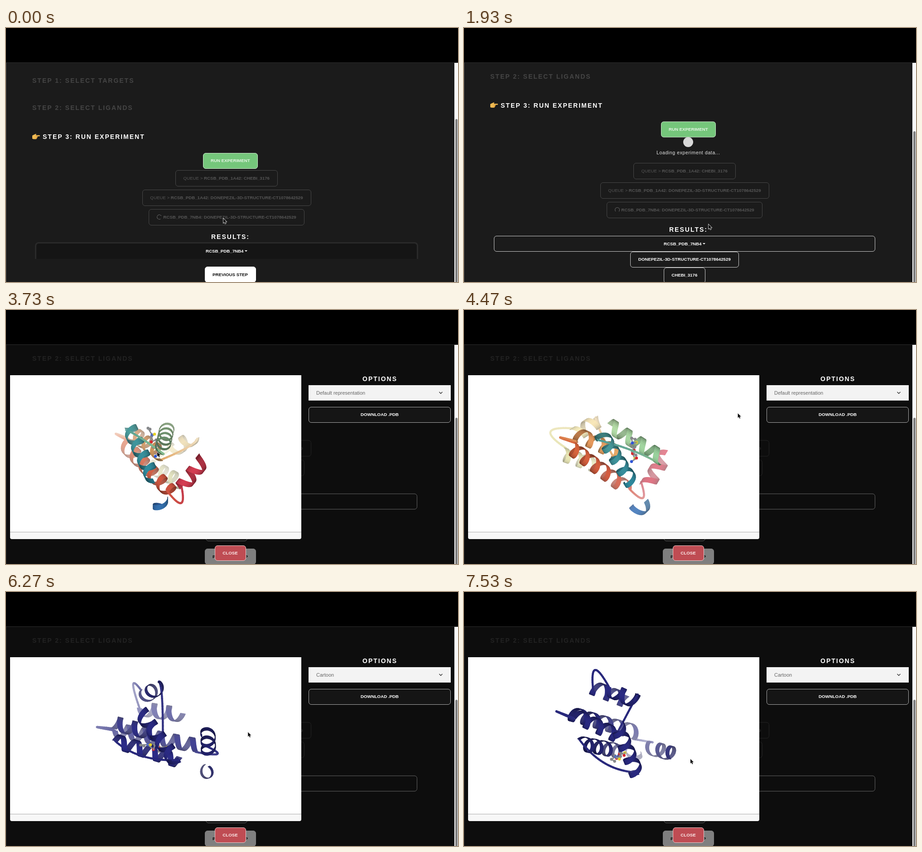
An HTML page with a canvas that plays this animation: 998x561 px, repeating every 7.59 s.

```html
<!DOCTYPE html>
<html lang="en">
<head>
<meta charset="utf-8">
<title>Docking experiment</title>
<style>
html, body { margin: 0; width: 998px; height: 561px; overflow: hidden; background: #000; }
body { position: relative; font: bold 9.7px "Liberation Sans", Arial, sans-serif; color: #fff; }
div, canvas, svg { position: absolute; box-sizing: border-box; }
.fill { left: 0; top: 0; width: 998px; height: 561px; }
.txt { height: 20px; line-height: 20px; white-space: pre; }
.head { font-size: 14px; letter-spacing: 2px; }
.dim { color: #454545; }
.box { text-align: center; white-space: pre; border: 1px solid #ccc; border-radius: 6px; }
.queue { border: 1.5px solid #484848; color: #555; font-weight: normal; }
.run { background: #75c67b; border-color: #cfebcf; color: #e4f4e4; }
.prev { background: #fff; border-color: #fff; color: #111; }
.close { background: #bf4c53; border-color: #ecc9cb; color: #fbeaea; }
.quiet { border: 3px solid #2a2a2a; border-bottom: 0; background: #151515; border-radius: 8px 8px 0 0; }
.caret { border: 3px solid transparent; border-top-color: #fff; border-bottom: 0; width: 6px; height: 3px; }
.load { font-weight: normal; font-size: 10.5px; letter-spacing: .62px; color: #e8e8e8; }
.ring { border: 1.5px solid #666; border-bottom-color: transparent; border-radius: 50%; }
.field { font-weight: normal; font-size: 11px; color: #666; }
.item { font-weight: normal; font-size: 11.4px; color: #eee; }
#menu { left: 664px; top: 171px; width: 313px; height: 242px; border-radius: 5px; border: 1px solid #444;
  background: linear-gradient(#424345, #2a2a2b 30px, #202021 80px, #1e1e1f); }
</style>
</head>
<body>
<div id="view" style="left:0;top:76px;width:998px;height:485px;overflow:hidden;background:#1b1b1b;border-top:1px solid #2e2e2e">
  <div id="doc" class="fill" style="top:-77px">
    <div id="upper" class="fill">
      <svg style="left:58px;top:233px" width="18" height="14" viewBox="0 0 18 14">
        <path d="M0 4.5 4 2.6 8 .8Q9.500 1 8.500 2.500L7.800 3.800H16Q18 5 16 6.200H11.500Q12.600 8 11 8.600 11.500 10.300 10 10.600 10 12.500 8 12.500H3L0 11.500Z" fill="#f0b951"/>
        <path d="M8 6.300H12M8 8.600H11M7.500 10.700H10" stroke="#c98529" stroke-width=".8"/>
      </svg>
    </div>
    <div id="lower" class="fill"></div>
    <div id="foot" class="fill"></div>
    <div id="loading" class="fill"></div>
  </div>
  <div style="left:0;top:0;width:1px;height:485px;background:#444"></div>
</div>
<div id="modal" class="fill">
  <div style="left:0;top:77px;width:990px;height:484px;background:rgba(0,0,0,.5)"></div>
  <div style="left:8.500px;top:144px;width:643px;height:346px;background:#fff"></div>
  <div style="left:8.500px;top:490px;width:643px;height:15.500px;background:#f7f7f7;border-top:1px solid #aaa;border-radius:0 0 4px 4px"></div>
  <div style="left:668px;top:166px;width:314px;height:33.500px;background:#f3f3f3"></div>
  <svg style="left:955px;top:179px" width="10" height="8"><path d="M1.500 2 5 5.500 8.500 2" fill="none" stroke="#333" stroke-width="1.400"/></svg>
</div>
<div id="menu"></div>
<div style="left:990px;top:77px;width:8px;height:484px;background:#fafafa"></div>
<div id="thumb" style="left:992px;width:5px;height:400px;background:#7d7d7d;border-radius:3px 3px 0 0"></div>
<canvas id="art" class="fill" width="998" height="561"></canvas>
<script>
const LOOP = 7590, SHIFT = -69.5, GAP = 53.5;
const OPEN = 400, LOAD = 1100, MODAL = 2200, MODEL = 2330, MENU = 4950, PICK = 5470;
const el = id => document.getElementById(id);

function add(parent, cls, css, html = '') {
  const d = document.createElement('div');
  d.className = cls;
  d.style.cssText = css;
  d.innerHTML = html;
  parent.appendChild(d);
  return d;
}
const text = (p, cls, x, y, s) => add(p, 'txt ' + cls, `left:${x}px;top:${y - 10}px`, s);
const box = (p, cls, x, y, w, h, s, css = '') =>
  add(p, 'box ' + cls, `left:${x}px;top:${y}px;width:${w}px;height:${h}px;line-height:${h - 2}px;${css}`, s);

const [upper, lower, foot, loading, modal, menu, thumb] =
  ['upper', 'lower', 'foot', 'loading', 'modal', 'menu', 'thumb'].map(el);
const LIGAND = 'DONEPEZIL-3D-STRUCTURE-CT1078642529';
text(upper, 'head dim', 58, 116, 'STEP 1: SELECT TARGETS');
text(upper, 'head dim', 58, 175.5, 'STEP 2: SELECT LIGANDS');
text(upper, 'head', 81, 240, 'STEP 3: RUN EXPERIMENT');
box(upper, 'run', 434.5, 276, 121.5, 34.5, 'RUN EXPERIMENT');

box(lower, 'queue', 373.5, 314, 226.5, 35.5, 'QUEUE &gt; <b>RCSB_PDB_1A42: CHEBI_3176</b>');
box(lower, 'queue', 300.5, 357, 373, 35.5, `QUEUE &gt; <b>RCSB_PDB_1A42: ${LIGAND}</b>`);
box(lower, 'queue', 315, 400, 344, 35.5, `<b>RCSB_PDB_7NB4: ${LIGAND}</b>`, 'text-indent:14px');
const ring = add(lower, 'ring', 'left:332.5px;top:411.5px;width:11px;height:11px');
text(lower, 'head', 453, 461, 'RESULTS:');
const quiet = box(lower, 'quiet', 64, 473, 846, 37, '');
const bar = box(lower, '', 66, 475, 841.5, 35, '');
text(lower, '', 441, 492.5, 'RCSB_PDB_7NB4');
add(lower, 'caret', 'left:527px;top:491px');
const items = add(lower, 'fill', '');
box(items, '', 367, 510, 239.5, 34.5, LIGAND);
box(items, '', 441, 545, 91.5, 34.5, 'CHEBI_3176');
box(foot, 'prev', 438.5, 526.5, 113, 35, 'PREVIOUS STEP');

const dot = add(loading, '', 'left:484px;top:241px;width:22px;height:22px;border-radius:50%;background:#d9d9d9');
text(loading, 'load', 425, 275, 'Loading experiment data...');

text(modal, 'head', 787, 152, 'OPTIONS');
const field = text(modal, 'field', 685, 183, '');
box(modal, '', 668, 214, 314, 34.5, 'DOWNLOAD .PDB', 'background:#151515;border-color:#aaa');
box(modal, 'close', 460.5, 519.5, 69, 34.5, 'CLOSE');
text(menu, 'item', 4, 12, '✓');
['Default representation', 'Cartoon', 'Backbone', 'Balls and sticks', 'Contact', 'Helixorient', 'Hyperball', 'Licorice',
  'Ribbon', 'Rope', 'Surface', 'Spacefill', 'Unitcell'].forEach((s, i) => text(menu, 'item', 15, 12 + 18 * i, s));

// Vectors and timing
const mix = (a, b, k) => a + (b - a) * k;
const blend = (a, b, k) => a.map((v, i) => mix(v, b[i], k));
const plus = (a, b, k = 1) => a.map((v, i) => v + b[i] * k);
const cross = (a, b) => [a[1] * b[2] - a[2] * b[1], a[2] * b[0] - a[0] * b[2], a[0] * b[1] - a[1] * b[0]];
const unit = a => a.map(v => v / Math.hypot(...a));
const clamp = (v, lo, hi) => Math.max(lo, Math.min(hi, v));

// Eased values of [time, ...values] keys at time t.
function keyed(keys, t) {
  let i = 0;
  while (i < keys.length - 2 && t >= keys[i + 1][0]) i++;
  const [a, b] = [keys[i], keys[i + 1]], k = clamp((t - a[0]) / (b[0] - a[0]), 0, 1);
  return blend(a, b, k * k * (3 - 2 * k)).slice(1);
}

// Protein chain in model space, centred on the origin: colour, helix ends, linked to the previous helix.
const CHAIN = [
  ['#3566ad', [-84, 114, -5], [-56, 118, -5], false],
  ['#2b8398', [-26, 66, 12], [46, -50, 66], false],
  ['#86ba8c', [56, 84, -10], [36, -52, -19], true],
  ['#dfe0ac', [-76, -20, -45], [-76, -93, 10], false],
  ['#e3d9a4', [-38, -96, -30], [5, -75, -75], true],
  ['#dca263', [2, 2, -5], [6, -95, 55], true],
  ['#d4633c', [-22, -88, 70], [-66, 62, -30], true],
  ['#bf374a', [-38, 98, -50], [26, 88, -100], true]
];
const RADIUS = 16, PITCH = 36, WIDTH = 12, CENTER = [336, 318];
const NAVY = [40, 40, 122];
const rgb = h => [1, 3, 5].map(i => parseInt(h.slice(i, i + 2), 16));

function coil(a, b) {
  const d = plus(b, a, -1), axis = unit(d), u = unit([-axis[1], axis[0], 0]), v = cross(u, axis);
  const turns = Math.hypot(...d) / PITCH, steps = Math.ceil(turns * 24);
  return Array.from({ length: steps + 1 }, (_, i) => {
    const q = 3 + 2 * Math.PI * turns * i / steps;
    const normal = plus(u.map(c => c * Math.cos(q)), v, Math.sin(q));
    return { p: plus(blend(a, b, i / steps), normal, RADIUS), normal, edge: axis.map(c => c * WIDTH / 2) };
  });
}

// A loop bulges away from the middle of the protein.
function link(a, b) {
  const bend = blend(a, b, .5).map(c => c * 1.8);
  return Array.from({ length: 25 }, (_, i) => ({ p: blend(blend(a, bend, i / 24), blend(bend, b, i / 24), i / 24) }));
}

const ribbons = [];
function addRibbon(rows, c1, c2) {
  for (let i = 1; i < rows.length; i++) ribbons.push({ a: rows[i - 1], b: rows[i], color: blend(c1, c2, i / rows.length) });
}
let tail;
CHAIN.forEach(([c, from, to, linked], i) => {
  const rows = coil(from, to), color = rgb(c), next = rgb((CHAIN[i + 1] || CHAIN[i])[0]);
  if (linked) addRibbon(link(tail.p, rows[0].p), tail.color, color);
  addRibbon(rows, color, blend(color, next, .35));
  tail = { p: rows[rows.length - 1].p, color: blend(color, next, .35) };
});

// The ligand zigzags along a line between the helices.
const TINT = { g: '#85878a', b: '#2e55d8', y: '#e6d327', r: '#d8262b' };
const atoms = [...'ggbygrgggryrb'].map((kind, i, all) => {
  const p = blend([66, 6, 18], [14, 42, 0], i / (all.length - 1));
  return { kind, p: plus(p, [Math.sin(i * 2.4) * 5, Math.cos(i * 2.4) * 6, Math.sin(i * 1.7) * 6]) };
});

// Time, then yaw, pitch and roll in degrees.
const VIEW = [[2740, 0, 0, 0], [3730, 90, 65, 0], [4400, 26, -1, -52], [5600, 26, -1, -52], [6930, 189, 34, -33], [7530, 100, -38, -28]];
const MOUSE = [[0, 480, 421], [OPEN, 490, 486], [LOAD, 490, 470], [1930, 540, 434], [2450, 560, 400], [2730, 477, 368],
  [3730, 334, 314], [MENU, 745, 184], [5330, 757, 205], [6930, 404, 371], [7530, 500, 369]];

function turner(angles) {
  const [[cy, sy], [cp, sp], [cr, sr]] = angles.map(a => a * Math.PI / 180).map(a => [Math.cos(a), Math.sin(a)]);
  return ([x, y, z]) => {
    [x, z] = [x * cy - z * sy, x * sy + z * cy];
    [y, z] = [y * cp - z * sp, y * sp + z * cp];
    return [x * cr - y * sr, x * sr + y * cr, z];
  };
}

const ctx = el('art').getContext('2d');

function tone(color, light, z) {
  const fog = clamp(-z / 170, 0, .65);
  return `rgb(${color.map(v => Math.round(mix(Math.min(255, v * light), 255, fog)))})`;
}

function drawRibbon({ a, b, color }, turn, navy) {
  const p = turn(a.p), q = turn(b.p), flat = !a.edge, nz = flat ? .8 : turn(b.normal)[2];
  const [ex, ey] = flat ? [0, 0] : turn(a.edge);
  const light = (.62 + .5 * Math.abs(nz)) * (nz < 0 ? .82 : 1);
  ctx.fillStyle = ctx.strokeStyle = tone(navy ? NAVY : color, light, q[2]);
  ctx.lineWidth = flat ? 4.5 : 1.4;
  ctx.beginPath();
  ctx.moveTo(p[0] - ex, p[1] - ey);
  ctx.lineTo(p[0] + ex, p[1] + ey);
  ctx.lineTo(q[0] + ex, q[1] + ey);
  ctx.lineTo(q[0] - ex, q[1] - ey);
  ctx.closePath();
  ctx.fill();
  ctx.stroke();
}

function drawAtom(atom, i, turn) {
  const [x, y] = turn(atom.p), [px, py] = turn(atoms[Math.max(0, i - 1)].p);
  ctx.lineWidth = 3;
  ctx.strokeStyle = '#8a8c8e';
  ctx.beginPath();
  ctx.moveTo(px, py);
  ctx.lineTo(x, y);
  ctx.stroke();
  ctx.fillStyle = TINT[atom.kind];
  ctx.beginPath();
  ctx.arc(x, y, 3.2, 0, 7);
  ctx.fill();
}

function drawModel(t) {
  const turn = turner(keyed(VIEW, t)), navy = t > PICK + 30;
  const jobs = ribbons.map(r => ({ z: turn(r.b.p)[2], draw: () => drawRibbon(r, turn, navy) }));
  atoms.forEach((a, i) => jobs.push({ z: turn(a.p)[2] + 15, draw: () => drawAtom(a, i, turn) }));
  ctx.save();
  ctx.translate(...CENTER);
  ctx.lineJoin = ctx.lineCap = 'round';
  jobs.sort((a, b) => a.z - b.z).forEach(j => j.draw());
  ctx.restore();
}

function drawMouse(t) {
  ctx.save();
  ctx.translate(...keyed(MOUSE, t));
  ctx.lineWidth = 1.6;
  ctx.strokeStyle = '#e8e8e8';
  ctx.fillStyle = '#0a0a0a';
  const arrow = new Path2D('M0 0V9.500L2.200 7.600 3.800 11.200 5.400 10.500 3.900 7 6.800 6.800Z');
  ctx.stroke(arrow);
  ctx.fill(arrow);
  ctx.restore();
}

const show = (node, on) => { node.style.display = on ? '' : 'none'; };
const shift = (node, y) => { node.style.transform = `translateY(${y}px)`; };

function render(t) {
  const open = t >= OPEN, busy = t >= LOAD && t < MODAL;
  shift(upper, open ? SHIFT : 0);
  shift(lower, (open ? SHIFT : 0) + (busy ? GAP : 0));
  shift(foot, busy ? GAP : 0);
  show(items, open);
  show(bar, open);
  show(quiet, !open);
  show(loading, busy);
  const pulse = ((t - 1930) / 750 + 10.5) % 1;
  dot.style.transform = `scale(${Math.min(1, pulse * 2)})`;
  dot.style.opacity = pulse < .5 ? 1 : 2 - 2 * pulse;
  ring.style.transform = `rotate(${(t - 1930) / 870 * 360}deg)`;
  thumb.style.top = (!open ? 201 : busy ? 228 : 238) + 'px';
  show(modal, t >= MODAL);
  show(menu, t >= MENU && t < PICK);
  field.textContent = t < PICK ? 'Default representation' : 'Cartoon';
  ctx.clearRect(0, 0, 998, 561);
  if (t >= MODEL) drawModel(t);
  drawMouse(t);
}

const start = performance.now();
function tick() {
  render((performance.now() - start) % LOOP);
  requestAnimationFrame(tick);
}
tick();
</script>
</body>
</html>
```
